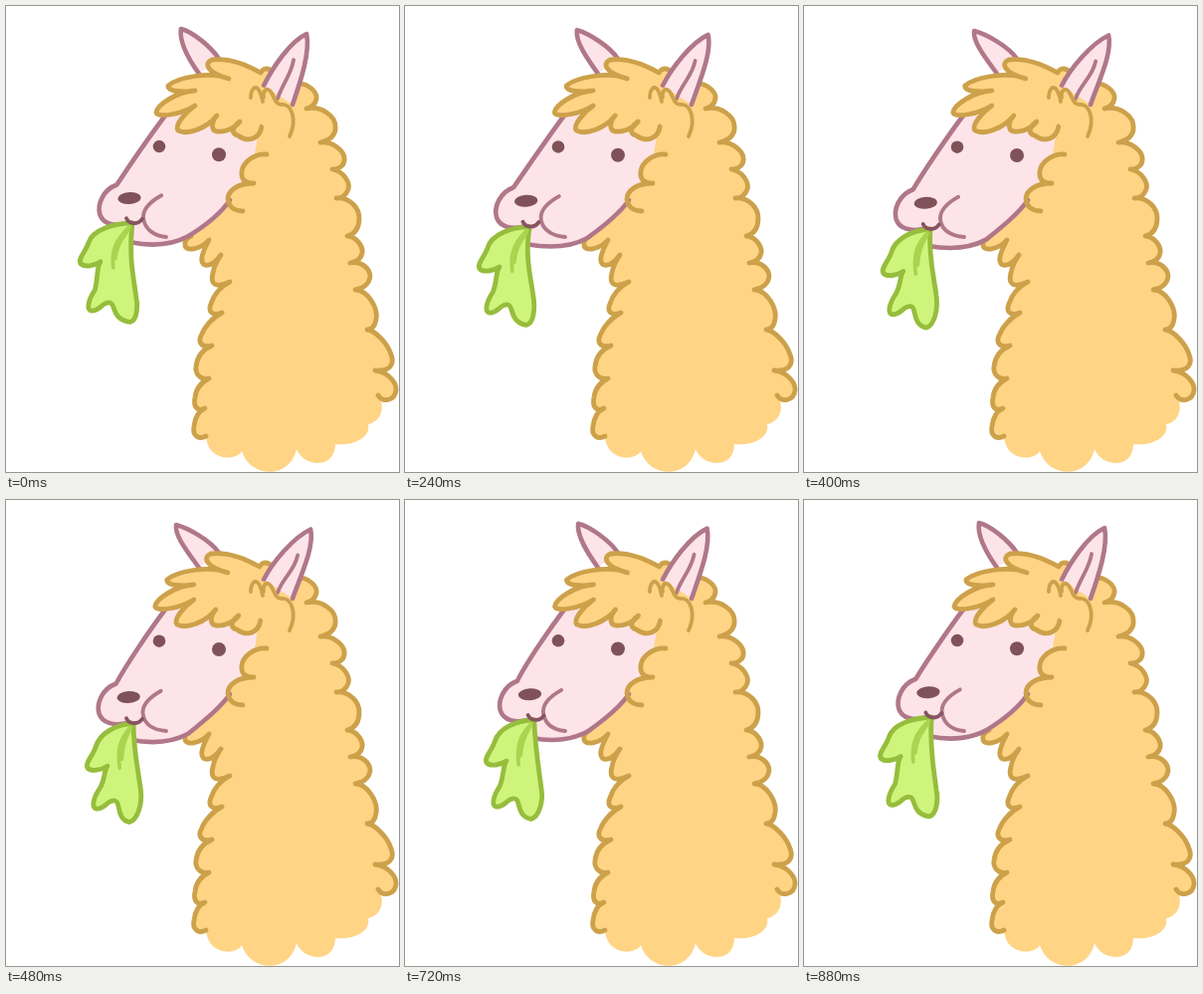
Animation, 395 px wide and 468 px high, one loop 960 ms. Source, as an HTML page:

```html
<!DOCTYPE html>
<html lang="en">
<head>
<meta charset="utf-8">
<title>Munching alpaca</title>
<style>
  html, body { margin: 0; width: 100%; height: 100%; overflow: hidden; background: #fff; }
  svg { display: block; width: 100vw; height: 100vh; }
  path { fill: none; stroke-linecap: round; stroke-linejoin: round; }
  .wool { fill: #ffd485; }
  .curl { stroke: #cda14a; stroke-width: 4.8; }
  .skin { fill: #fde4e8; }
  .edge { stroke: #b0778a; stroke-width: 4.6; }
  .thin { stroke-width: 3.8; }
  .dark { fill: #7f525a; }
  #mouth { stroke: #885462; stroke-width: 3.8; }
  #leaf { fill: #cff47c; stroke: #96bd3c; stroke-width: 4.8; }
  #vein { stroke: #aad450; stroke-width: 3.8; }
</style>
</head>
<body>
<svg viewBox="0 0 395 468">
  <path id="earL" class="skin edge"/>
  <path id="body" class="wool"/>
  <path id="right" class="curl"/>
  <path id="left" class="curl"/>
  <path id="face" class="skin"/>
  <path id="snout" class="edge"/>
  <path id="jaw" class="edge"/>
  <path id="cheek" class="edge thin"/>
  <path class="curl" d="M262 149C248 148 238 158 237 166C236 174 240 178 249 178C232 178 223 186 223 194C224 203 231 206 238 206"/>
  <g id="brow">
    <ellipse class="dark" cx="154" cy="141" rx="6.3" ry="6.2"/>
    <ellipse class="dark" cx="214" cy="149.3" rx="7" ry="7"/>
  </g>
  <ellipse id="nose" class="dark" rx="11.6" ry="6"/>
  <g id="fringe">
    <path class="wool curl" d="M268 66C263 61 258 63 256 67C240 58 222 52 207 54C199 57 201 67 224 73C205 65 172 72 163 80C162 86 178 87 190 85C172 86 152 99 151 107C153 113 178 108 190 100C180 107 169 120 173 125C182 130 202 123 212 110C206 117 206 125 212 126C220 127 230 123 235 116C227 122 226 128 233 130C244 138 255 133 257 121"/>
  </g>
  <path id="earR" class="skin edge"/>
  <path id="earRin" class="edge thin"/>
  <path class="wool" d="M253 83C256 80 262 82 266 86C270 92 270 99 277 99C286 97 293 115 285 131L258 120L250 97Z"/>
  <path class="curl thin" d="M246 92C246 84 250 80 253 83C256 86 257 91 258 96M259 92C258 85 262 81 266 86C270 91 270 99 277 99C287 98 293 114 285 131"/>
  <path id="leaf"/>
  <path id="vein"/>
  <path id="mouth"/>
</svg>
<script>
const el = id => document.getElementById(id);
const draw = (id, d) => el(id).setAttribute('d', d);
const STEP = 80, POSES = 12;

// Scallops down the back, along the bottom, and up the chest
const back = 'C303 77 313 86 312 93C311 99 306 102 302 103C318 100 331 111 331 121' +
  'C332 129 326 135 316 137C330 136 339 146 340 152C341 159 336 164 328 164' +
  'C340 166 346 178 344 184C342 190 338 193 332 193C347 192 355 204 355 213' +
  'C355 223 351 229 343 231C354 232 359 243 358 248C357 254 352 257 346 258' +
  'C358 256 366 264 366 272C365 279 359 284 351 285C364 285 374 304 372 314' +
  'C371 322 368 325 363 325C372 326 384 340 387 350C391 360 386 367 371 366' +
  'C383 367 393 378 392 386C391 396 379 399 374 391';
const hem = 'C382 402 377 418 364 420C367 434 348 442 331 440C331 465 300 464 292 445' +
  'C285 476 245 474 237 447C232 457 203 458 201 432';
const chest = 'C193 436 187 431 189 422C190 414 193 407 200 404C192 408 188 402 190 393' +
  'C191 384 196 378 204 374C194 376 190 368 191 362C192 352 198 345 207 341' +
  'C196 344 193 337 196 331C199 323 207 313 217 308C206 312 203 306 206 299' +
  'C208 292 214 283 225 277C210 284 205 279 208 268C209 261 212 256 216 250' +
  'C206 264 195 263 197 252C198 246 201 241 204 235C195 245 180 247 180 240' +
  'C179 236 182 233 186 231';
draw('body', 'M292 78' + back + hem + chest + 'L220 190L230 62L258 66Z');
draw('right', 'M292 78' + back);
draw('left', 'M201 432' + chest);

function pose(i) {
  const swing = (mid, amp, peak) => mid + amp * Math.cos((i - peak) * 2 * Math.PI / POSES);
  const ear = swing(0.5, 0.5, 5.5);

  // Ears
  const lx = 176 - 5 * ear, ly = 23 + 2 * ear;
  draw('earL', `M194 68C184 54 ${lx - 2} 36 ${lx} ${ly}C${lx + 12} ${ly + 3} 206 41 214 53`);
  const rx = 302 + 4.2 * ear, ry = 28 + 1.5 * ear;
  draw('earR', `M259 80C268 62 ${rx - 17} ${ry + 8} ${rx} ${ry}C${rx + 4} ${ry + 18} 296 76 288 99`);
  draw('earRin', `M${rx - 13} ${ry + 26}C${rx - 16} ${ry + 42} 278 78 273 93`);
  el('fringe').setAttribute('transform', `translate(${-1.2 * ear} 0)`);
  el('brow').setAttribute('transform', `translate(0 ${0.7 * ear})`);

  // Muzzle circles as it chews
  const mx = swing(0, 2, 9.4), my = swing(0, 2.5, 5.8);
  const X = x => x + mx, Y = y => y + my;
  const cx = 129 + swing(0, 2.6, 9), cy = swing(218.8, 3, 5.8);
  const snout = `M160 110C145 130 121 165 ${X(111)} ${Y(182)}` +
    `C${X(97)} ${Y(187)} ${X(91)} ${Y(202)} ${X(94)} ${Y(212)}` +
    `C${X(97)} ${Y(221)} ${X(108)} ${Y(225)} ${cx - 6} ${cy + 2}`;
  const chin = swing(240, 1.8, 5.8);
  const jaw = `${cx - 4} ${chin - 1}C150 ${chin + 4} 170 ${chin} 183 ${chin - 7}C200 221 216 208 225 195`;
  draw('face', snout + 'L' + jaw +
    'C222 186 232 179 242 177C236 173 236 160 239 157C241 153 246 150 250 149L253 130L240 95L190 90Z');
  draw('snout', snout);
  draw('jaw', 'M' + jaw);
  const hx = mx * 0.6, hy = my * 0.3;
  draw('cheek', `M${156 + hx} ${191 + hy}C${147 + hx} ${196 + hy} ${136 + hx} ${204 + hy} ${138 + hx} ${215 + hy}` +
    `C${140 + hx} ${226 + hy} 150 231 161 232`);
  el('nose').setAttribute('transform', `translate(${X(123.6)} ${Y(195.5)}) rotate(-3)`);
  draw('mouth', `M${cx - 8} ${cy - 2.5}C${cx - 5} ${cy + 4} ${cx + 4} ${cy + 4} ${cx + 8} ${cy - 2}`);

  // Leaf hangs from the mouth and trails behind it
  const ox = swing(127.5, 2.3, 8.5), oy = swing(221, 3.3, 5.8);
  const ax = swing(78.5, 5, 7.5), ay = swing(263, 5.2, 6);
  const bx = swing(88, 4.3, 7.8), by = swing(308, 2, 6);
  const tx = swing(124.3, 2.4, 9.3), ty = swing(320.5, 3, 6);
  const sx = swing(134, 4.8, 8), bow = ox + (sx - 134) * 0.8 - 2;
  draw('leaf', `M${ox} ${oy}C${ox - 18} ${oy + 1} ${ax + 12} ${ay - 34} ${ax + 8} ${ay - 20}` +
    `C${ax + 5} ${ay - 11} ${ax - 3} ${ay - 4} ${ax} ${ay + 1}` +
    `C${ax + 4} ${ay + 5} ${ax + 14} ${ay + 3} ${ax + 20} ${ay - 1}` +
    `C${ax + 16} ${ay + 4} ${ax + 18} ${ay + 12} ${bx + 4} ${by - 21}` +
    `C${bx - 4} ${by - 9} ${bx - 4} ${by - 1} ${bx} ${by}` +
    `C${bx + 9} ${by + 1} ${bx + 11} ${by - 9} ${bx + 19} ${by - 8}` +
    `C${bx + 25} ${by - 7} ${bx + 20} ${ty - 3} ${tx} ${ty}` +
    `C${tx + 8} ${ty - 2} ${sx + 1} ${ty - 18} ${sx - 1} 291` +
    `C${sx - 3} 274 ${bow} 252 ${ox} ${oy}Z`);
  const vx = swing(111, 4.5, 7.5);
  draw('vein', `M${ox - 3} ${oy + 4}C${ox - 11} ${oy + 13} ${vx - 3} ${oy + 22} ${vx} ${oy + 45}` +
    `M${ox - 3} ${oy + 5}C${ox - 7} ${oy + 13} ${vx + 3} ${oy + 20} ${vx + 2} ${oy + 36}`);
}

let last = -1;
function tick(now) {
  const i = Math.floor(now / STEP) % POSES;
  if (i !== last) pose(last = i);
  requestAnimationFrame(tick);
}
pose(0);
requestAnimationFrame(tick);
</script>
</body>
</html>
```
